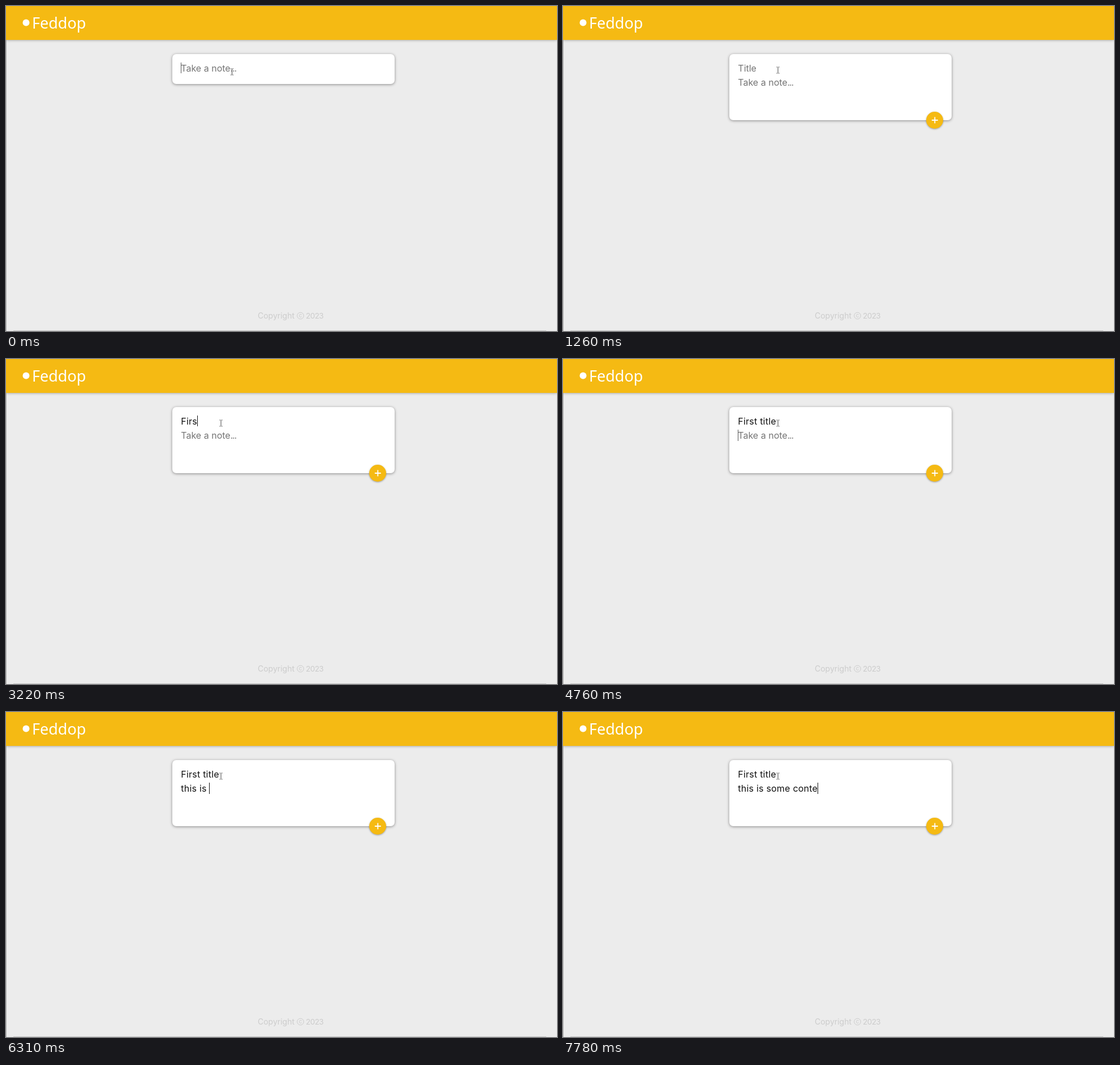
An HTML page that plays this animation: 974x575 px, repeating every 8000 ms.

```html
<!DOCTYPE html>
<html lang="en">
<head>
<meta charset="utf-8">
<title>Notes</title>
<style>
  html, body { margin: 0; width: 100%; height: 100%; overflow: hidden; background: #ececec; }
  div, svg { position: absolute; }
  #header { left: 0; top: 0; width: 974px; height: 60px; background: #f5ba13; box-shadow: 0 0 5px rgba(0,0,0,.4); }
  #edge { left: 0; top: 60px; width: 1px; height: 515px; background: #b4b4b4; }
  #foot { left: 13px; top: 574px; width: 942px; height: 1px; background: #c0c0c0; }
  #card { left: 294px; top: 85px; width: 393px; border-radius: 7px; background: #fff; box-shadow: 0 1px 5px rgb(138,137,137); }
  #fab { border-radius: 50%; background: #f5ba13; box-shadow: 0 1px 3px rgba(0,0,0,.35); }
  svg { left: 0; top: 0; }
  text { font-family: Inter, "Open Sans", sans-serif; white-space: pre; }
  .field { font-size: 16px; }
  .copy { font-size: 14px; fill: #ccc; }
</style>
</head>
<body>
<div id="edge"></div>
<div id="foot"></div>
<div id="header"></div>
<div id="card"></div>
<div id="fab"></div>
<svg width="974" height="575" viewBox="0 0 974 575">
  <circle cx="35.5" cy="29.5" r="6" fill="#fff"/>
  <text x="46" y="39.5" fill="#fff" style="font: 500 27px 'Noto Sans', sans-serif">Feddop</text>

  <text class="copy" x="445" y="553">Copyright</text>
  <circle cx="520.5" cy="548" r="5.8" fill="none" stroke="#ccc"/>
  <text class="copy" x="520.5" y="551.2" text-anchor="middle" style="font-size: 10px">c</text>
  <text class="copy" x="530" y="553" style="font-size: 13.5px; letter-spacing: -.55px">2023</text>

  <text id="title" class="field" x="309.3" y="115.6"></text>
  <text id="note" class="field" x="309.3" y="140.9"></text>
  <rect id="caret" width="1" fill="#111"/>
  <path id="plus" stroke="#fff" stroke-width="1.8" fill="none"/>
  <path id="mouse" d="M-2.5 -5.5H-.7M.7 -5.5H2.5M0 -5V5M-2.5 5.5H-.7M.7 5.5H2.5" stroke="#444" fill="none"/>
</svg>
<script>
const LOOP = 8000;
const $ = id => document.getElementById(id);
const title = $("title"), note = $("note"), caret = $("caret");

// [time, characters typed so far]
const titleKeys = [[2430, 1], [2580, 2], [2970, 3], [3220, 4], [3370, 5], [3510, 6],
  [3970, 7], [4090, 8], [4240, 10], [4360, 11]];
const noteKeys = [[5530, 1], [5650, 2], [5770, 3], [5890, 4], [6010, 5], [6160, 6], [6310, 8],
  [6560, 9], [6840, 10], [6960, 11], [7080, 13], [7350, 14], [7490, 16], [7780, 18]];
// [time, focused row or null while the caret is hidden]
const focus = [[0, "title"], [150, "note"], [420, null], [670, "title"], [1260, null],
  [1690, "title"], [2280, null], [2430, "title"], [4760, "note"], [5380, null], [5530, "note"]];
const mouseKeys = [[0, [399.5, 116.5]], [300, [389.5, 114.5]], [420, [380, 113.5]]];
const fabKeys = [[0, 0], [150, 13], [300, 15]];

function at(keys, t, first) {
  let value = first;
  for (const [time, v] of keys) if (t >= time) value = v;
  return value;
}

function write(el, typed, hint) {
  const key = typed + "|" + hint;
  if (el.dataset.key === key) return;
  el.dataset.key = key;
  el.setAttribute("fill", typed ? "#111" : "#757575");
  el.style.letterSpacing = typed ? ".22px" : "0";
  el.textContent = typed || hint.replace("...", "");
  if (!typed && hint.endsWith("...")) {
    const dots = document.createElementNS("http://www.w3.org/2000/svg", "tspan");
    dots.style.letterSpacing = "-1.2px";
    dots.textContent = "...";
    el.append(dots);
  }
}

function draw(t) {
  const open = t >= 150;
  const titleText = "First title".slice(0, at(titleKeys, t, 0));
  const noteText = "this is some content".slice(0, at(noteKeys, t, 0));
  write(title, titleText, open ? "Title" : "Take a note...");
  write(note, noteText, open ? "Take a note..." : "");
  $("card").style.height = (open ? 117 : 53) + "px";

  const row = at(focus, t, null);
  caret.style.display = row ? "" : "none";
  if (row) {
    const inTitle = row === "title";
    const typed = inTitle ? titleText : noteText;
    const width = typed ? (inTitle ? title : note).getComputedTextLength() : 0;
    caret.setAttribute("x", Math.round(309 + width));
    caret.setAttribute("y", inTitle ? 100 : 125);
    caret.setAttribute("height", inTitle ? 19 : 20);
    caret.setAttribute("fill", typed ? "#111" : "#555");
  }

  const r = at(fabKeys, t, 0), cx = 657.3, cy = 202, arm = r * .36;
  Object.assign($("fab").style, {
    display: r ? "" : "none",
    left: cx - r + "px", top: cy - r + "px", width: 2 * r + "px", height: 2 * r + "px"
  });
  $("plus").setAttribute("d", r ? `M${cx - arm} ${cy}h${2 * arm}M${cx} ${cy - arm}v${2 * arm}` : "");

  const [mx, my] = at(mouseKeys, t);
  $("mouse").setAttribute("transform", `translate(${mx} ${my})`);
}

const start = performance.now();
function tick() {
  draw((performance.now() - start) % LOOP);
  requestAnimationFrame(tick);
}
tick();
</script>
</body>
</html>
```
